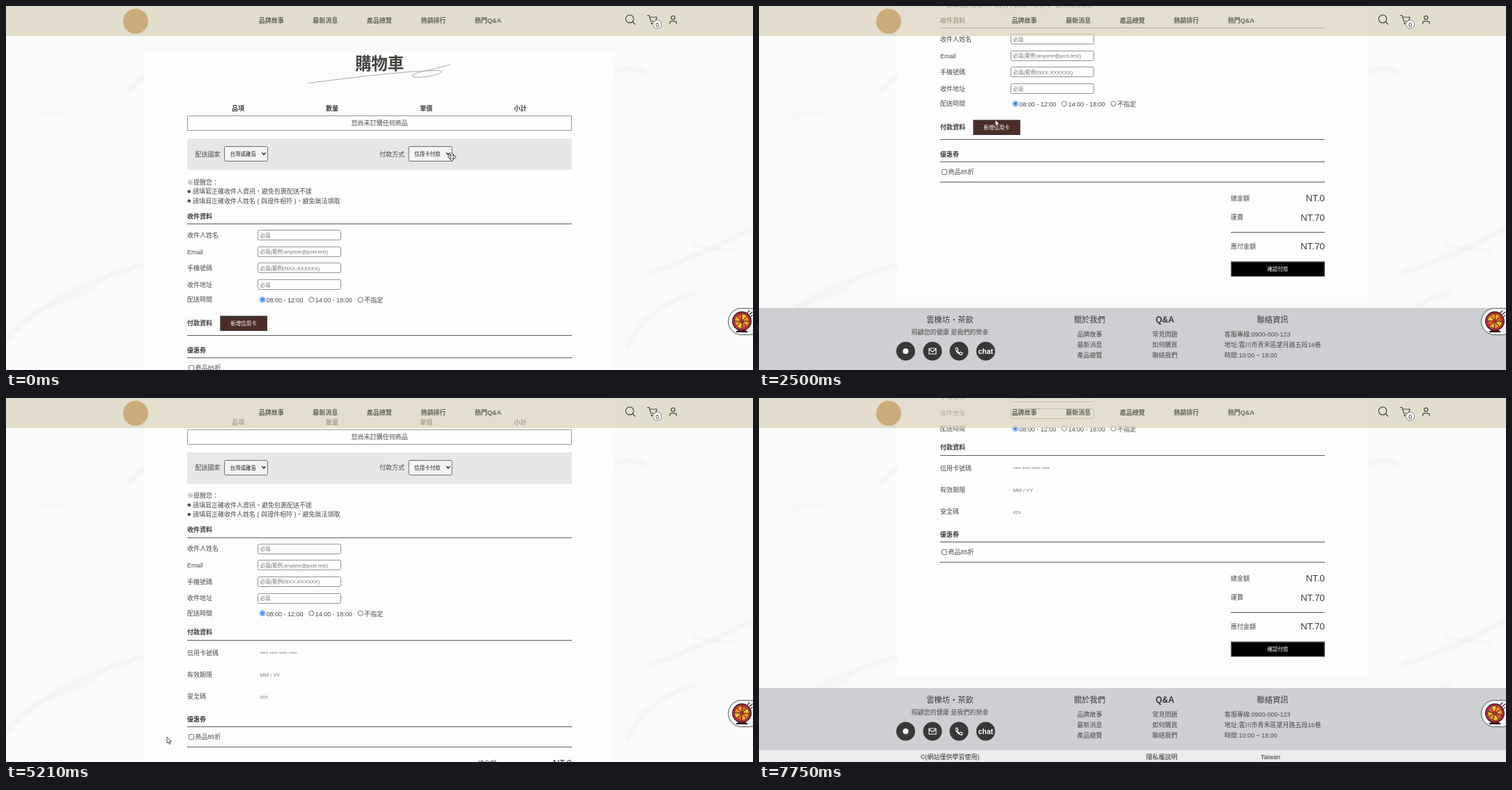
Recreate the animation shown at these times as an HTML page with a canvas. Size 1072x522 px, loop 7.92 s.

```html
<!DOCTYPE html>
<html lang="zh-Hant">
<head>
<meta charset="utf-8">
<title>購物車</title>
<style>
html, body { margin: 0; width: 100%; height: 100%; overflow: hidden; background: #fafafa; }
canvas { display: block; width: 1072px; height: 522px; }
</style>
</head>
<body>
<canvas id="stage"></canvas>
<script>
const W = 1072, H = 522, LOOP = 7920;
const FONT = '"Liberation Sans", "Noto Sans CJK TC", "Noto Sans CJK JP", "Noto Sans CJK", sans-serif';
const INK = '#4a4a48';
const canvas = document.getElementById('stage');
const ctx = canvas.getContext('2d');
const dpr = window.devicePixelRatio || 1;
canvas.width = W * dpr;
canvas.height = H * dpr;

// Keys: [time, values...]
const SCROLL = [[250, 0], [1170, 96.5], [1330, 96.5], [1700, 281], [3440, 281], [3800, 112.5],
  [5380, 112.5], [6080, 0.5], [6290, 0.5], [7050, 377.5]];
const POINTER = [[170, 638, 215], [330, 635, 214], [1330, 635, 214], [2420, 339, 163], [3460, 339, 163],
  [3900, 490, 305], [4040, 490, 305], [5130, 231, 486], [5380, 231, 486], [6150, 771, 269],
  [6290, 771, 269], [7300, 1080, 300]];
const OPEN_AT = 3460, FIELDS_AT = 3700, NUMBER_AT = 4300;

function at(keys, t) {
  if (t <= keys[0][0]) return keys[0].slice(1);
  for (let i = 1; i < keys.length; i++) {
    const a = keys[i - 1], b = keys[i];
    if (t < b[0]) {
      const u = (t - a[0]) / (b[0] - a[0]), e = u * u * (3 - 2 * u);
      return a.slice(1).map((v, k) => v + (b[k + 1] - v) * e);
    }
  }
  return keys[keys.length - 1].slice(1);
}

function text(str, x, y, size = 9, color = INK, align = 'left', weight = 400) {
  ctx.font = `${weight} ${size}px ${FONT}`;
  ctx.fillStyle = color;
  ctx.textAlign = align;
  ctx.fillText(str, x, y + size * 0.37);
}

function rect(x, y, w, h, color) {
  ctx.fillStyle = color;
  ctx.fillRect(x, Math.round(y), w, h);
}

function box(x, y, w, h, fill, stroke, r = 0) {
  ctx.beginPath();
  ctx.roundRect(x + 0.5, Math.round(y) + 0.5, w - 1, h - 1, r);
  ctx.fillStyle = fill;
  ctx.fill();
  ctx.lineWidth = 1;
  ctx.strokeStyle = stroke;
  ctx.stroke();
}

function dot(x, y, r, fill, stroke, width = 1) {
  ctx.beginPath();
  ctx.arc(x, y, r, 0, Math.PI * 2);
  if (fill) { ctx.fillStyle = fill; ctx.fill(); }
  if (stroke) { ctx.lineWidth = width; ctx.strokeStyle = stroke; ctx.stroke(); }
}

function stroke(d, color, width, x = 0, y = 0) {
  ctx.save();
  ctx.translate(x, y);
  ctx.strokeStyle = color;
  ctx.lineWidth = width;
  ctx.lineCap = ctx.lineJoin = 'round';
  ctx.stroke(new Path2D(d));
  ctx.restore();
}

function backdrop() {
  rect(0, 0, W, H, '#fafafa');
  ctx.save();
  ctx.filter = 'blur(2px)';
  const veins = ['M40 160Q60 152 88 155', 'M175 122Q192 104 212 88', 'M0 478Q60 410 196 372',
    'M60 432L130 404', 'M872 96Q895 84 915 95', 'M925 382Q990 362 1072 318',
    'M985 344L1050 352', 'M890 490Q920 430 990 412'];
  veins.forEach((d, i) => stroke(d, 'rgba(110,110,110,.06)', 3 + i % 3));
  ctx.restore();
}

function select(label, x, y) {
  box(x, y, 63, 22, '#f4f4f2', '#6e6e6e', 2);
  text(label, x + 8.5, y + 11.3, 7.5, '#222', 'left', 500);
  stroke('M-2.2 -1.2L0 1.2L2.2 -1.2', '#222', 1.4, x + 57, y + 11);
}

function button(label, x, y, w, fill) {
  rect(x, y, w, 22, '#77726f');
  rect(x + 1, y + 1, w - 1, 21, '#3c3836');
  rect(x + 1.5, y + 2, w - 3, 19, fill);
  text(label, x + w / 2, y + 11.3, 7.5, '#fff', 'center', 500);
}

function rule(y, x = 260, w = 552) { rect(x, y, w, 1, '#5c5a56'); }

function heading(str, y) { text(str, 260, y, 9, '#3c3c3a', 'left', 700); }

function form(s) {
  text('購物車', 536, 82 - s, 23.4, '#42423e', 'center', 700);
  stroke('M434.500 110.500C500 102 575 93 619 92.500C634 93 620 99 603 101.500C590 103 578 102 584 98.500C593 94 618 90 637 84',
    '#a29f92', 0.9, 0, -s);
  ['品項', '數量', '單價', '小計'].forEach((c, i) =>
    text(c, 333 + i * 135, 147 - s, 9, '#3c3c3a', 'center', 700));
  box(260, 157 - s, 552, 22, '#fdfdfe', '#9a9a98');
  text('您尚未訂購任何商品', 536, 168 - s, 9, INK, 'center');

  rect(260, 190 - s, 552, 45, '#e7e7e6');
  text('配送國家', 271.5, 212.5 - s);
  select('台灣或離島', 313, 201 - s);
  text('付款方式', 536, 212.5 - s);
  select('信用卡付款', 577.5, 201 - s);

  text('※提醒您：', 260, 252.5 - s);
  ['請填寫正確收件人資訊，避免包裹配送不達', '請填寫正確收件人姓名 ( 與證件相符 )，避免無法領取'].forEach((l, i) => {
    const y = 266 + i * 13.5 - s;
    dot(262.8, y, 2.3, INK);
    text(l, 268, y);
  });

  heading('收件資料', 301.5 - s);
  rule(312 - s);
  [['收件人姓名', '必填'], ['Email', '必填(範例:anyone@post.test)'],
    ['手機號碼', '必填(範例09XX-XXXXXX)'], ['收件地址', '必填']].forEach(([label, hint], i) => {
    const y = 328.5 + i * 23.7 - s;
    text(label, 260, y);
    box(361, y - 7.5, 120, 15, '#fff', '#92928f', 2);
    text(hint, 364.5, y + 0.3, 7.5, '#777');
  });
  text('配送時間', 260, 421 - s);
  [['08:00 - 12:00', 368], ['14:00 - 18:00', 438.2], ['不指定', 508.7]].forEach(([l, x], i) => {
    dot(x, 421.2 - s, 3.6, '#fff', i ? '#777' : '#1a73e8');
    if (!i) dot(x, 421.2 - s, 2.1, '#1a73e8');
    text(l, x + 5.5, 422 - s);
  });
}

function payment(s, t) {
  if (t < OPEN_AT) {
    heading('付款資料', 455 - s);
    button('新增信用卡', 307, 444 - s, 68, '#4a2d27');
    rule(472 - s);
    return;
  }
  heading('付款資料', 448 - s);
  rule(459 - s);
  [['信用卡號碼', '**** **** **** ****', NUMBER_AT], ['有效期限', 'MM / YY', FIELDS_AT],
    ['安全碼', 'ccv', FIELDS_AT]].forEach(([label, hint, start], i) => {
    const y = 478 + i * 31.2 - s;
    text(label, 260, y);
    if (t >= start) text(hint, 364.5, y + 0.5, 7.5, '#777');
  });
}

function summary(s) {
  heading('優惠券', 493.5 - s);
  rule(504 - s);
  box(262, 514.5 - s, 8, 8, '#fff', '#777', 1.5);
  text('商品85折', 271.5, 518.5 - s);
  rule(532.5 - s);
  [['總金額', 'NT.0', 556.5], ['運費', 'NT.70', 584], ['應付金額', 'NT.70', 625.5]].forEach(([l, v, y]) => {
    text(l, 677, y - s);
    text(v, 812, y - s, 13.3, '#3c3c3a', 'right');
  });
  rule(604.5 - s, 677, 135);
  button('確認付款', 677, 647 - s, 135, '#000');
}

function footer(y) {
  rect(0, y, W, 89, '#cecfd3');
  rect(0, y + 89, W, 40, '#ececec');
  [['雲櫟坊・茶飲', 274], ['關於我們', 474.5], ['Q&A', 582.5], ['聯絡資訊', 737]].forEach(([l, x], i) =>
    text(l, x, y + 17, i === 2 ? 12 : 11.25, '#3a3a3a', 'center', i === 2 ? 700 : 500));
  text('照顧您的健康 是我們的榮幸', 274, y + 35, 9, INK, 'center');
  [210.5, 249, 287, 325.3].forEach(x => dot(x, y + 62, 13.5, '#383838'));
  dot(210.5, y + 62, 4, '#fff');
  stroke('M-5 -4H5V4H-5ZM-5 -3L0 1L5 -3', '#fff', 1.1, 249, y + 62);
  stroke('M-4.500 -4.500L-2.500 -5L-1 -2L-2.500 -.7Q-1.500 1.500 1 2.700L2.300 1.200L5 2.600L4.600 4.700Q3 6 -1 3T-4.500 -4.500Z',
    '#fff', 1.1, 287, y + 62);
  text('chat', 325.3, y + 62, 10.5, '#fff', 'center', 700);
  [['品牌故事', '最新消息', '產品總覽'], ['常見問題', '如何購買', '聯絡我們']].forEach((list, c) =>
    list.forEach((l, i) => text(l, 474.5 + c * 108, y + 38 + i * 14.6, 9, INK, 'center')));
  ['客服專線:0900-000-123', '地址:雲川市青禾區望月路五段16巷', '時間:10:00 ~ 18:00'].forEach((l, i) =>
    text(l, 668, y + 38 + i * 14.6));
  [['©(網站僅供學習使用)', 274], ['隱私權說明', 578], ['Taiwan', 734]].forEach(([l, x]) =>
    text(l, x, y + 99, 9, '#333', 'center'));
}

function header() {
  rect(0, 0, W, 43, 'rgba(218,210,187,.7)');
  dot(186, 22, 18, '#c9ae7c');
  ['品牌故事', '最新消息', '產品總覽', '熱銷排行', '熱門Q&A'].forEach((l, i) =>
    text(l, 362.7 + i * 77.5, 20.5, 9, '#66635b', 'left', 700));
  const c = '#4c4a45';
  dot(895, 18.5, 5.7, null, c, 1.2);
  stroke('M899.300 22.800L902.500 26', c, 1.3);
  stroke('M920.500 13.500H923L925.500 22H932L934 16H924', c, 1.2);
  dot(926.5, 25, 1.2, c);
  dot(934.5, 26.2, 6, '#fdfdfb', '#66635b', 0.8);
  text('0', 934.7, 26.4, 8.5, '#222', 'center');
  dot(957.2, 16.8, 2.6, null, c, 1.2);
  stroke('M952.500 25.500V24.500Q952.500 21.800 955 21.800H959.500Q962 21.800 962 24.500V25.500', c, 1.2);
}

function wheel(t) {
  ctx.beginPath();
  ctx.roundRect(1036.5, 433.5, 50, 38, 19);
  ctx.fillStyle = '#f1f1f3';
  ctx.fill();
  ctx.lineWidth = 1;
  ctx.strokeStyle = '#55585f';
  ctx.stroke();
  const x = 1056, y = 452, spin = t / LOOP * Math.PI * 8;
  rect(x - 6, y + 12, 12, 3, '#7d1a24');
  rect(x - 8, y + 14, 16, 2, '#2b1a22');
  dot(x, y, 13.2, '#d8343c', '#2b1a22', 1.4);
  const colors = ['#f6a623', '#e4572e', '#f8c63a', '#f08a24'];
  for (let i = 0; i < 8; i++) {
    const a = spin + i * Math.PI / 4;
    ctx.beginPath();
    ctx.moveTo(x, y);
    ctx.arc(x, y, 10.5, a, a + Math.PI / 4);
    ctx.closePath();
    ctx.fillStyle = colors[i % 4];
    ctx.fill();
    ctx.lineWidth = 0.8;
    ctx.strokeStyle = '#3a1d22';
    ctx.stroke();
  }
  dot(x, y, 2.2, '#d8343c', '#2b1a22', 0.8);
  stroke('M1064 440L1067 437M1067 442L1071 439M1069 445L1071 444', '#33262c', 1.1);
}

function pointer(t) {
  if (t < 170) {
    const arm = 'M0 -5.500L2 -3.200H.8V-.8H3.200V-2L5.500 0L3.200 2V.8H.8V3.200H2L0 5.500L-2 3.200H-.8V.8H-3.200V2L-5.500 0L-3.200 -2V-.8H-.8V-3.200H-2Z';
    stroke(arm, '#333', 1.6, 640, 216.5);
    ctx.save();
    ctx.translate(640, 216.5);
    ctx.fillStyle = '#fff';
    ctx.fill(new Path2D(arm));
    ctx.restore();
    return;
  }
  const [x, y] = at(POINTER, t);
  const arrow = new Path2D('M0 0V9L2.100 7.200L3.500 10.500L5 9.800L3.600 6.700H6.400Z');
  ctx.save();
  ctx.translate(x, y);
  ctx.fillStyle = '#fff';
  ctx.fill(arrow);
  ctx.strokeStyle = '#222';
  ctx.lineWidth = 0.8;
  ctx.stroke(arrow);
  ctx.restore();
}

function draw(now) {
  const t = now % LOOP;
  const [s] = at(SCROLL, t);
  const grow = t < OPEN_AT ? 0 : 79.5;
  ctx.setTransform(dpr, 0, 0, dpr, 0, 0);
  backdrop();
  rect(198, 65.5 - s, 675, 631.5 + grow, '#fdfdfe');
  form(s);
  payment(s, t);
  summary(s - grow);
  footer(714 + grow - s);
  header();
  wheel(t);
  pointer(t);
  requestAnimationFrame(tick);
}

const start = performance.now();
function tick() { draw(performance.now() - start); }
tick();
</script>
</body>
</html>
```
